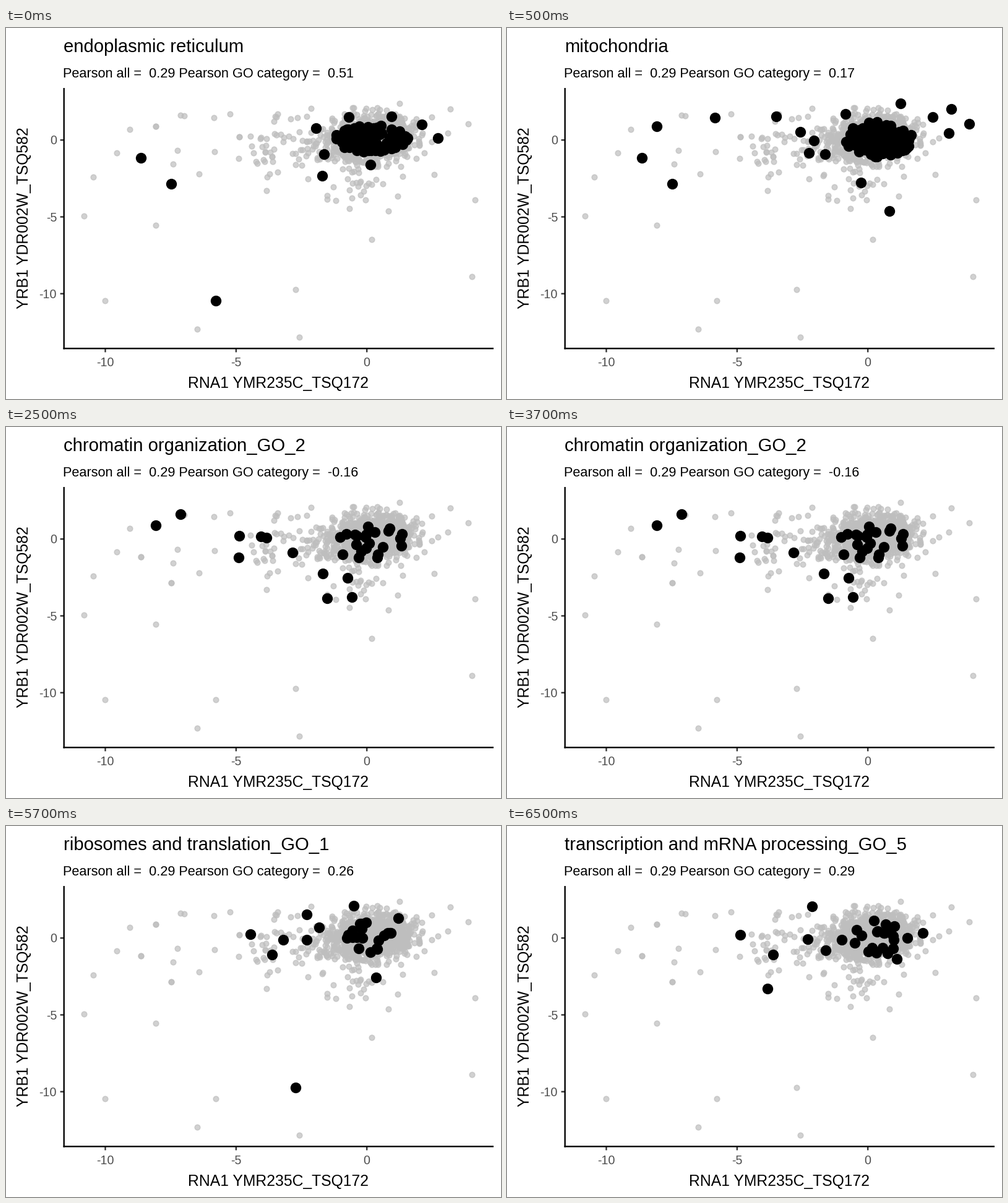
Animation of 800x600 px, one loop 8 s. Source, as a matplotlib script:

```python
import numpy as np
import matplotlib.pyplot as plt
from matplotlib.animation import FuncAnimation

W, H, DPI = 800, 600, 100
PT = 72 / DPI                      # points per pixel
STEP, LOOP = 500, 8000
plt.rcParams["font.family"] = "Liberation Sans"


def ellipse_fill(seed, n, center, radii):
    """Even scatter of n points inside an ellipse."""
    rng = np.random.default_rng(seed)
    r, a = np.sqrt(rng.random(n)), rng.uniform(0, 2 * np.pi, n)
    return np.c_[r * np.cos(a), r * np.sin(a)] * radii + center


def background():
    """Dense core in a wider halo, with a thin arm to the left and a few drops below."""
    rng = np.random.default_rng(4)
    core = rng.normal((591, 177), (29, 15), (780, 2))
    halo = rng.normal((574, 184), (46, 25), (290, 2))
    cloud = np.vstack([core, halo])
    cloud[:, 1] -= 0.12 * (cloud[:, 0] - 585)
    cloud = cloud[(((cloud - (583, 181)) / (106, 56)) ** 2).sum(axis=1) < 1]
    arm = np.c_[488 - rng.exponential(75, 42), rng.normal(189, 27, 42).clip(138, 246)]
    drops = np.c_[rng.normal(575, 30, 18), 238 + rng.exponential(27, 18)]
    return np.vstack([cloud, arm[arm[:, 0] > 170], drops])


# Key points that stand apart from the cloud, in stage pixels
FAR = [(125, 303), (140, 240), (159, 440), (178, 201), (199, 163), (241, 318),
       (308, 486), (473, 499), (590, 341), (691, 236), (752, 401), (757, 277)]

# Start time, title, correlation, outlying members, members in the cloud
CATEGORIES = [
    (0, "endoplasmic reticulum", "0.51",
     [(217, 209), (266, 251), (338, 440), (510, 238), (500, 161), (513, 203),
      (697, 177), (671, 155), (622, 142), (553, 143), (588, 220)],
     ellipse_fill(1, 105, (590, 178), (60, 22))),
    (500, "mitochondria", "0.17",
     [(217, 209), (266, 251), (241, 158), (335, 144), (434, 142), (473, 167),
      (487, 201), (495, 181), (513, 203), (546, 138), (571, 249), (617, 295),
      (635, 121), (687, 143), (717, 130), (713, 169), (746, 154)],
     ellipse_fill(2, 115, (601, 179), (55, 29))),
    (2500, "chromatin organization_GO_2", "-0.16",
     [(241, 158), (281, 140), (376, 175), (375, 210), (411, 176), (420, 178),
      (462, 202), (511, 236), (518, 276), (551, 243), (558, 274)],
     ellipse_fill(3, 22, (588, 188), (74, 28))),
    (4500, "ribosomes and translation_GO_1", "0.26",
     [(394, 174), (429, 207), (447, 183), (485, 183), (485, 142), (505, 163),
      (467, 422), (561, 128), (597, 244), (633, 148)],
     ellipse_fill(4, 20, (593, 179), (43, 25))),
    (6500, "transcription and mRNA processing_GO_5", "0.29",
     [(376, 175), (429, 207), (420, 262), (485, 182), (492, 129), (514, 200),
      (540, 183), (629, 214), (671, 172)],
     ellipse_fill(5, 20, (602, 177), (45, 31))),
]
STARTS = [category[0] for category in CATEGORIES]
MEMBERS = [np.vstack([outer, inner]) for *_, outer, inner in CATEGORIES]

fig = plt.figure(figsize=(W / DPI, H / DPI), dpi=DPI, facecolor="white")
ax = fig.add_axes([0, 0, 1, 1])
ax.set_xlim(0, W)
ax.set_ylim(H, 0)
ax.axis("off")


def label(x, y, text, size, **style):
    return ax.text(x, y, text, fontsize=size * PT, va="baseline",
                   rotation_mode="anchor", **style)


def line(x, y, color):
    ax.plot(x, y, color=color, lw=2.37 * PT, solid_capstyle="butt", snap=False)


def dots(points, radius, color, **style):
    x, y = np.transpose(points) + 0.5      # pixel centres
    return ax.scatter(x, y, s=(2 * radius * PT) ** 2, facecolor=color, edgecolor=color,
                      linewidth=1.57 * PT, **style)


dots(np.vstack([FAR, background(), *MEMBERS]), 4.3, "#bebebe", alpha=0.7, zorder=1)
black = dots(MEMBERS[0], 7.9, "black", zorder=2)

for value in (-10, -5, 0):
    x, y = 583.2 + 42.27 * value, 181.2 - 24.85 * value
    line([x, x], [518.3, 524.4], "#333333")
    line([87.6, 93.7], [y, y], "#333333")
    label(x - 0.5, 547, str(value), 19.6, ha="center", color="#4d4d4d")
    label(82, y + 7.3, str(value), 19.6, ha="right", color="#4d4d4d")
line([93.7, 93.7], [97, 519.5], "black")
line([92.5, 788], [518.3, 518.3], "black")

label(440.5, 582, "RNA1 YMR235C_TSQ172", 24.75, ha="center")
label(36, 307, "YRB1 YDR002W_TSQ582", 24.75, ha="center", rotation=90)
title = label(93, 39, "", 29.2)
subtitle = label(92, 80, "", 21.75)


def draw(frame):
    index = np.searchsorted(STARTS, frame * STEP, side="right") - 1
    _, name, score, *_ = CATEGORIES[index]
    title.set_text(name)
    subtitle.set_text(f"Pearson all =  0.29 Pearson GO category =  {score}")
    black.set_offsets(MEMBERS[index] + 0.5)
    return title, subtitle, black


anim = FuncAnimation(fig, draw, frames=LOOP // STEP, interval=STEP, repeat=True,
                     repeat_delay=0)
plt.show()
```
